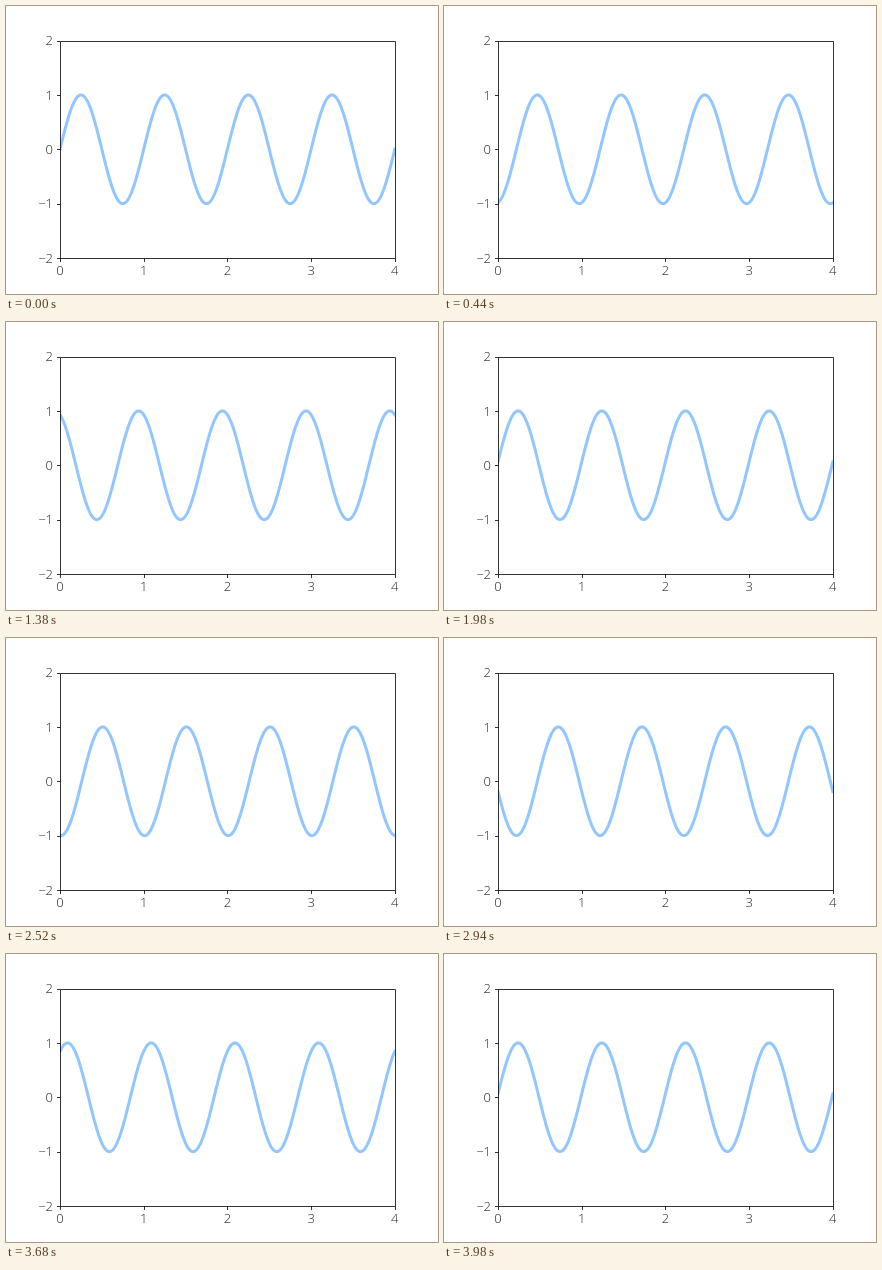
Recreate the animation shown at these times as an HTML page. Size 432 px wide and 288 px high, loop 4 s.

```html
<!DOCTYPE html>
<html lang="en">
<head>
<meta charset="utf-8">
<title>Travelling sine wave</title>
<style>
  html, body { margin: 0; width: 100%; height: 100%; overflow: hidden; background: #fff; }
  svg { display: block; }
  text { font: 300 13px "Open Sans", "Noto Sans", sans-serif; fill: #262626; }
  #wave { fill: none; stroke: #92c6ff; stroke-width: 3; stroke-linecap: square; stroke-linejoin: round; }
  #axes { fill: none; stroke: #000; stroke-width: 0.8; }
</style>
</head>
<body>
<svg width="432" height="288" viewBox="0 0 432 288">
  <clipPath id="plot"><rect x="54" y="35" width="335" height="217"/></clipPath>
  <g clip-path="url(#plot)"><path id="wave"/></g>
  <path id="axes"/>
  <g id="labels"></g>
</svg>
<script>
  const STEP = 20, STEPS = 200, SAMPLES = 500;
  const toX = x => 54 + x * 83.7;
  const toY = y => 143.28 - y * 54.36;
  const snap = v => Math.floor(v + 0.5) + 0.5;
  const wave = document.getElementById('wave');

  function addLabel(value, x, y, anchor) {
    const label = document.createElementNS('http://www.w3.org/2000/svg', 'text');
    label.setAttribute('x', x);
    label.setAttribute('y', y);
    label.setAttribute('text-anchor', anchor);
    label.textContent = String(value).replace('-', '\u2212');
    document.getElementById('labels').append(label);
  }

  function drawAxes() {
    let d = 'M54.5 35.5H389.5V252.5H54.5Z';
    for (let i = 0; i <= 4; i++) {
      const x = toX(i), y = toY(i - 2);
      d += `M${snap(x)} 252.5v3.5M54.5 ${snap(y)}h-3.5`;
      addLabel(i, x, 269.3, 'middle');
      addLabel(i - 2, 47, Math.round(y + 4.8), 'end');
    }
    document.getElementById('axes').setAttribute('d', d);
  }

  function drawWave(shift) {
    const points = [];
    for (let i = 0; i <= SAMPLES; i++) {
      const x = 4 * i / SAMPLES;
      const y = Math.sin(2 * Math.PI * (x - shift));
      points.push(toX(x).toFixed(2) + ' ' + toY(y).toFixed(2));
    }
    wave.setAttribute('d', 'M' + points.join('L'));
  }

  const start = performance.now();
  function tick() {
    const elapsed = performance.now() - start;
    drawWave(0.01 * (Math.floor(elapsed / STEP) % STEPS));
    requestAnimationFrame(tick);
  }

  drawAxes();
  drawWave(0);
  requestAnimationFrame(tick);
</script>
</body>
</html>
```
